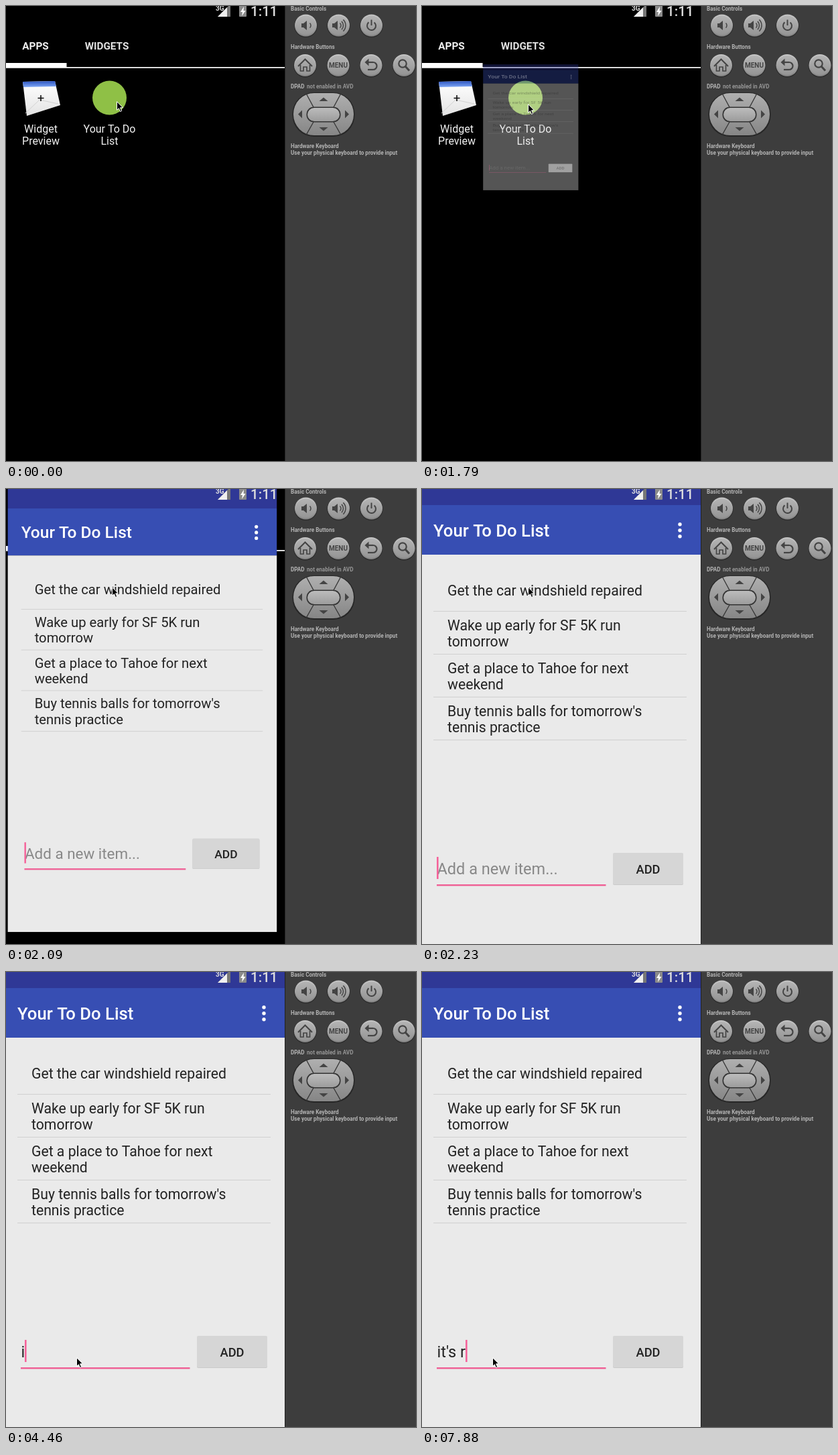
An HTML page with a canvas for the animation above (8 s loop, 612 by 679 pixels).

```html
<!DOCTYPE html>
<html lang="en">
<head>
<meta charset="utf-8">
<title>To do list</title>
<style>
html, body { margin: 0; width: 100%; height: 100%; overflow: hidden; background: #000; }
canvas { display: block; }
</style>
</head>
<body>
<canvas id="stage" width="612" height="679"></canvas>
<script>
const c = document.getElementById('stage').getContext('2d');
const LOOP = 8000;
const FONT = 'Roboto, "Liberation Sans", sans-serif';

// [start ms, value] lists: the last entry that has started is current
const POINTER = [
  [0, [165, 142]], [150, [164, 141]], [900, [163, 143]], [1050, [160, 145]], [1200, [158, 146]],
  [2380, [157, 186]], [2530, [151, 340]], [2680, [142, 480]], [2830, [131, 521]],
  [2980, [118, 550]], [3120, [110, 566]], [3270, [106, 573]], [3420, [105, 575]]
];
const OPENING = [[0, 0], [1790, 0.14], [1940, 0.63], [2090, 0.94], [2230, 1]];
const TYPED = [
  [0, ''], [4460, 'i'], [4610, 'it'], [4760, "it'"], [4910, "it's"], [5060, "it's "],
  [6100, "it's r"], [6250, "it's ra"], [6390, "it's rain"], [6690, "it's raing"],
  [6840, "it's raingin"], [7280, "it's raing"], [7580, "it's rain"], [7730, "it's rai"], [7880, "it's r"]
];
const CARET = [[0, 1], [2530, 0], [2980, 1], [3420, 0], [3870, 1], [5500, 0], [6100, 1]];

const at = (list, t) => list.reduce((v, [start, next]) => t >= start ? next : v, list[0][1]);
const mix = (a, b, p) => a + (b - a) * p;

function rect(x, y, w, h, fill) {
  c.fillStyle = fill;
  c.fillRect(x, y, w, h);
}

function round(x, y, w, h, r, fill) {
  c.fillStyle = fill;
  c.beginPath();
  c.roundRect(x, y, w, h, r);
  c.fill();
}

function disc(x, y, r, fill) {
  c.fillStyle = fill;
  c.beginPath();
  c.arc(x, y, r, 0, 7);
  c.fill();
}

function trace(points, close) {
  c.beginPath();
  for (let i = 0; i < points.length; i += 2) c.lineTo(points[i], points[i + 1]);
  if (close) c.closePath();
}

function poly(points, fill) {
  trace(points, true);
  c.fillStyle = fill;
  c.fill();
}

function line(points, color, width) {
  trace(points);
  c.strokeStyle = color;
  c.lineWidth = width;
  c.stroke();
}

function arc(x, y, r, from, to, color, width) {
  c.beginPath();
  c.arc(x, y, r, from, to);
  c.strokeStyle = color;
  c.lineWidth = width;
  c.stroke();
}

function text(str, x, y, size, color, weight = 400, align = 'left') {
  c.font = `${weight} ${size}px ${FONT}`;
  c.textAlign = align;
  c.fillStyle = color;
  c.fillText(str, x, y);
}

function shade(y0, y1, top, bottom) {
  const g = c.createLinearGradient(0, y0, 0, y1);
  g.addColorStop(0, top);
  g.addColorStop(1, bottom);
  return g;
}

function drawLauncher(pressed) {
  rect(0, 0, 417, 679, '#000');
  text('APPS', 44, 64.5, 15.3, '#f2f2f2', 700, 'center');
  text('WIDGETS', 150.5, 64.5, 15.3, '#e4e4e4', 700, 'center');
  rect(0, 91, 416, 1.7, '#fff');
  rect(0, 85, 90.5, 7, '#fff');

  poly([25, 113, 73, 112, 81, 148, 31, 164], shade(112, 164, '#fff', '#e3e3e3'));
  poly([25, 113, 73, 112, 75, 120, 26, 121], shade(112, 121, '#2d55c0', '#7ea6f5'));
  line([29, 160, 50, 140, 78, 146], '#d2d2d2', 1);
  line([47.5, 137.5, 56.5, 137.5], '#111', 1.6);
  line([52, 133, 52, 142], '#111', 1.6);
  text('Widget', 52, 189, 16, '#f2f2f2', 400, 'center');
  text('Preview', 52, 206.5, 16, '#f2f2f2', 400, 'center');

  c.globalAlpha = pressed ? 0.42 : 1;
  disc(154.5, 137, 25.5, '#8fc046');
  text('Your To Do', 154.5, 189, 16, '#f2f2f2', 400, 'center');
  text('List', 154.5, 206.5, 16, '#f2f2f2', 400, 'center');
  c.globalAlpha = 1;
}

function drawApp(p, typed, caret) {
  const sx = mix(0.23, 1, p), sy = mix(0.15, 1, p);
  c.save();
  c.globalAlpha = Math.min(1, 0.2 + p * 1.17);
  c.translate(mix(155, 206, p) - 206 * sx, mix(155, 341, p) - 341 * sy);
  c.scale(sx, sy);

  rect(-4, -8, 421, 32, '#2f3896');
  rect(-4, 24, 421, 74, '#374eb3');
  rect(-4, 98, 421, 592, '#eaeaea');
  text('Your To Do List', 17, 70.5, 25.7, '#fff', 500);
  for (const y of [52.8, 61.8, 70.8]) disc(385, y, 2.7, '#fff');

  const items = [
    ['Get the car windshield repaired'],
    ['Wake up early for SF 5K run', 'tomorrow'],
    ['Get a place to Tahoe for next', 'weekend'],
    ["Buy tennis balls for tomorrow's", 'tennis practice']
  ];
  items.forEach((rows, i) => {
    const y = i ? 146.5 + i * 64 : 158.5;
    rows.forEach((row, j) => text(row, 38, y + j * 24.7, 21.2, '#222'));
    rect(17, 182 + i * 64, 378, 1, '#d0d0d0');
  });

  text(typed || 'Add a new item...', 22.5, 574.8, 23.5, typed ? '#222' : '#888');
  const width = typed ? c.measureText(typed).width : 0;
  if (caret) rect(22 + Math.round(width), 549, 2.6, 33, '#f5639a');
  rect(22, 590, 252.5, 2.4, '#ef5f95');
  round(285, 544, 105, 47, 2, '#cacaca');
  round(285, 543, 105, 47, 2, '#d6d6d6');
  text('ADD', 337.5, 573.8, 18.3, '#222', 500, 'center');
  c.restore();
}

function drawStatus() {
  text('3G', 313, 6.5, 10, '#e0e0e0', 700);
  poly([316, 16, 335, -3, 335, 16], '#777');
  poly([316, 16, 330, 2, 330, 16], '#f0f0f0');
  round(348, -2, 11, 18, 1, '#8a8a8a');
  poly([355, 1, 350, 9, 353, 9, 352, 15, 357.5, 7, 354.5, 7], '#fff');
  text('1:11', 405.5, 15, 20.5, '#dedede', 500, 'right');
}

function drawKey(x, y) {
  disc(x, y + 0.7, 17.3, '#2c2c2c');
  disc(x, y, 16.5, shade(y - 16, y + 16, '#c6c6c6', '#848484'));
  disc(x, y, 14.5, shade(y - 15, y + 15, '#b4b4b4', '#949494'));
}

function drawSpeaker(x, y) {
  poly([x - 7, y - 3, x - 4, y - 3, x + 1, y - 7, x + 1, y + 7, x - 4, y + 3, x - 7, y + 3], '#444');
}

function drawPad() {
  const g = shade(129, 194, '#b0b0b0', '#858585');
  round(427.5, 129, 93, 66, 32, '#262626');
  round(429, 130, 90, 63, 31, g);
  for (const s of [-1, 1]) {
    line([474 + s * 26, 130.5, 474 + s * 15, 151], '#333', 1.3);
    line([474 + s * 26, 192.5, 474 + s * 15, 173], '#333', 1.3);
    poly([474 + s * 38, 161.5, 474 + s * 32, 155.5, 474 + s * 32, 167.5], '#444');
    poly([474, 161.5 + s * 25, 467.5, 161.5 + s * 19.5, 480.5, 161.5 + s * 19.5], '#444');
  }
  round(448.5, 150.5, 51, 23, 11, '#333');
  round(450, 152, 48, 20, 10, shade(152, 172, '#bcbcbc', '#9c9c9c'));
}

function drawControls() {
  const ink = '#444';
  const label = (str, x, y, color = '#b4b4b4') => text(str, x, y, 8.15, color, 700);
  rect(416, 0, 1, 679, '#222');
  rect(417, 0, 195, 679, '#3d3d3d');
  label('Basic Controls', 425, 6.5);
  label('Hardware Buttons', 425, 63.5);
  label('DPAD', 425, 123);
  label('not enabled in AVD', 449, 123, '#969696');
  label('Hardware Keyboard', 425, 211.5);
  label('Use your physical keyboard to provide input', 425, 221.5);

  for (const x of [447.5, 496.5, 545.5]) drawKey(x, 29);
  for (const x of [446.5, 496, 545, 594]) drawKey(x, 88.5);
  drawSpeaker(448, 29);
  arc(450, 29, 5, -0.8, 0.8, ink, 1.5);
  drawSpeaker(494, 29);
  for (const r of [5, 8.5, 12]) arc(495, 29, r, -0.8, 0.8, ink, 1.5);
  arc(545.5, 29.5, 6.5, -0.9, 4.05, ink, 2);
  line([545.5, 20.5, 545.5, 29], ink, 2);

  line([436, 90, 446.5, 79.5, 457, 90], ink, 2);
  line([439.5, 88, 439.5, 97, 444, 97, 444, 91, 449, 91, 449, 97, 453.5, 97, 453.5, 88], ink, 1.7);
  text('MENU', 496, 92.3, 10, ink, 700, 'center');
  line([540, 84, 548, 84], ink, 2.2);
  arc(548, 89.5, 5.5, -Math.PI / 2, Math.PI / 2, ink, 2.2);
  line([548, 95, 540, 95], ink, 2.2);
  poly([535.5, 84, 541.5, 78.5, 541.5, 89.5], ink);
  arc(592, 86, 5.7, 0, 7, ink, 2.2);
  line([596, 90, 602, 96.5], ink, 3);
  drawPad();
}

function drawPointer([x, y]) {
  c.save();
  c.translate(x + 0.5, y + 0.7);
  trace([0, 0, 0, 12.6, 2.9, 10, 5, 14.8, 7.2, 13.8, 5.1, 9.1, 9, 9], true);
  c.fillStyle = '#000';
  c.fill();
  c.strokeStyle = '#fff';
  c.lineWidth = 1;
  c.stroke();
  c.restore();
}

function draw(t) {
  const p = at(OPENING, t);
  drawLauncher(t >= 1490 && t < 1790);
  if (p) drawApp(p, at(TYPED, t), at(CARET, t));
  drawStatus();
  drawControls();
  drawPointer(at(POINTER, t));
}

const begin = performance.now();
function tick() {
  draw((performance.now() - begin) % LOOP);
  requestAnimationFrame(tick);
}
tick();
</script>
</body>
</html>
```
